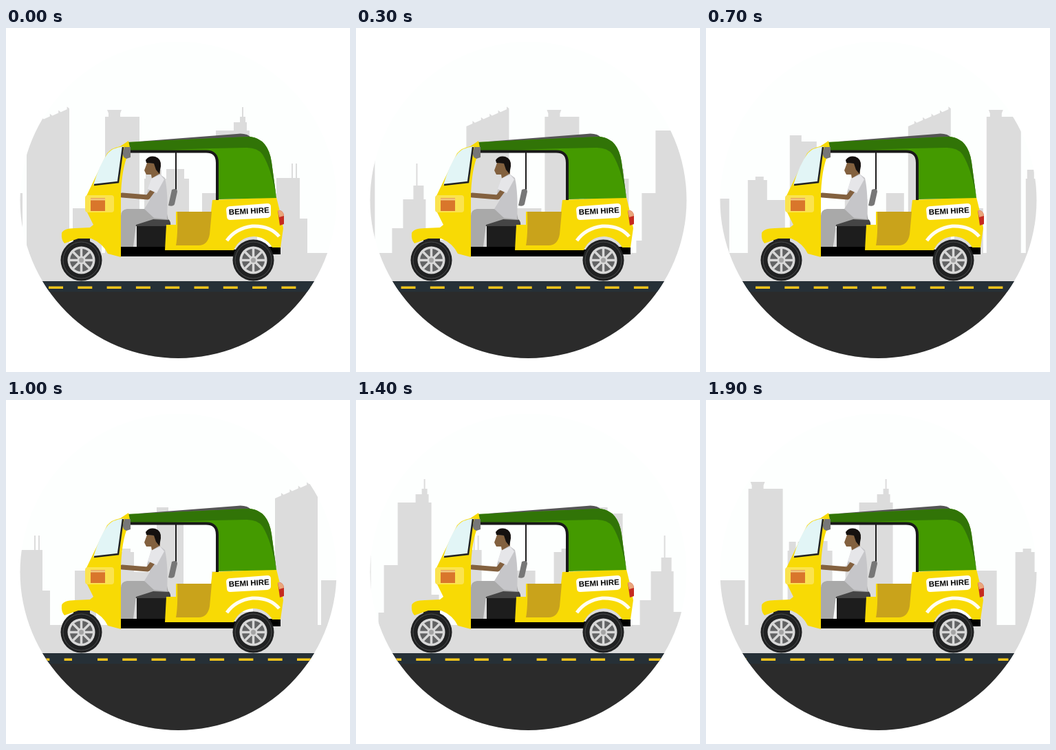
An HTML page that plays this animation: 500x500 px, repeating every 2000 ms.

```html
<!DOCTYPE html>
<html lang="en">
<head>
<meta charset="utf-8">
<title>Auto rickshaw ride</title>
<style>
  html, body { margin: 0; width: 100%; height: 100%; overflow: hidden; background: #fff; }
  svg { display: block; width: 100vw; height: 100vh; }
  text { font: bold 11.4px "Liberation Sans", Arial, sans-serif; }
</style>
</head>
<body>
<svg viewBox="0 0 500 500">
  <defs>
    <clipPath id="disc"><circle cx="250.500" cy="250" r="230"/></clipPath>

    <g id="skyline">
      <!-- low block, stubby tower and slab -->
      <path d="M-261 328V248h31v80zM-203 328V221h11v-5h12v5h5v29h26v53h7V156h17v9h22v163z"/>
      <!-- stepped block with one mast -->
      <path d="M-78 328V291h16v-42h15v-20h4v-32h2v32h9v20h3v59h29v20z"/>
      <path d="M-2 328V240h26v88z"/>
      <path id="sawtooth"/>
      <path d="M97 328V262h42v66z"/>
      <!-- crowned tower -->
      <path d="M144 328V129h5v-5l-2-5h21l-2 5v5h28v199z"/>
      <!-- hall with chimneys -->
      <path d="M201 328V219h2v-13h10v13h3v-13h10v13h7v-14h26v14h7v109z"/>
      <!-- spire tower and its neighbours -->
      <path d="M277 328V309h8V240h20V149h26v-12h9v-8h3v-14h2v14h3v8h2v12h4v134h11v45z"/>
      <!-- block with two masts -->
      <path d="M393 328V218h22v-21h2v21h4v-21h2v21h4v59h11v51z"/>
    </g>

    <g id="wheel">
      <circle r="30" fill="#202122"/>
      <circle r="26.500" fill="none" stroke="#4c4d4e"/>
      <circle r="20" fill="#d8d8d8"/>
      <circle r="16.500" fill="#626364"/>
      <path id="spokes" stroke="#d8d8d8" stroke-width="3.500"/>
      <circle r="6" fill="#d8d8d8"/>
      <circle r="3.500" fill="#a4a4a4"/>
    </g>
  </defs>

  <g clip-path="url(#disc)">
    <rect width="500" height="500" fill="#fdfffe"/>
    <g fill="#dcdcdc">
      <rect y="327" width="500" height="42"/>
      <g id="city"><use href="#skyline"/><use href="#skyline" x="-735"/></g>
    </g>
    <rect y="368" width="500" height="132" fill="#2b2b2b"/>
    <rect y="368" width="500" height="15.500" fill="#263037"/>
    <path id="dashes" fill="#f3c41c"/>
  </g>

  <!-- floor, seat and pole -->
  <path d="M167 318H233V322H336V332H167Z"/>
  <path d="M380 318H399V329H380Z"/>
  <path d="M190 286H233V318H190Z" fill="#1d1d1d"/>
  <path d="M188 278H236Q240 281 239 288H188Z" fill="#454545"/>
  <path d="M247 179V236" stroke="#1c1c1c" stroke-width="2"/>
  <path d="M241 235Q249 232 249 238L245 256Q243 260 236 258Z" fill="#777"/>

  <!-- driver -->
  <path d="M204 263H176Q167 264 167 273V318H185L189 286 214 278 236 279 234 270Z" fill="#a9a9a9"/>
  <path d="M205 196L201 207 204 213 211 213 212 219 224 215 223 197Z" fill="#83613f"/>
  <path d="M203 192Q208 185 217 187 226 190 225 201L223 212 218 206 215 197 204 196Z" fill="#15110f"/>
  <path d="M211 219L223 212 231 218Q236 240 234 278L215 276 201 263 209 250 205 239Z" fill="#c6c6c9"/>
  <path d="M215 234L206 246 169 243" fill="none" stroke="#83613f" stroke-width="7" stroke-linejoin="round" stroke-linecap="round"/>
  <path d="M211 219L224 213 230 220 219 240 206 234Z" fill="#e6e6e9"/>

  <!-- rear body -->
  <path d="M300 250L393 246Q399 268 403 291L399 319H387A31 31 0 0 0 331 323H231L233 286H247V267H298Z" fill="#f8da05"/>
  <path d="M249 267H299L296 300Q293 316 280 316H247Q250 300 249 267Z" fill="#c9a31b"/>
  <path d="M321 309Q334 291 358 288 384 287 397 303" fill="none" stroke="#fffdf0" stroke-width="5"/>
  <path d="M395 265Q403 264 404 273V285L398 287Z" fill="#c52a20"/>
  <path d="M395 265Q403 264 404 273L397 275Z" fill="#e9a57c"/>

  <!-- roof -->
  <path d="M192 165L335 154Q350 152 357 160L300 167Z" fill="#555"/>
  <path d="M177 166L330 159 355 158Q381 161 386 195L393 247 307 249 308 192Q306 180 290 180H178Z" fill="#449a00"/>
  <path d="M177 166L330 159 355 158Q381 161 386 195L393 247Q386 205 373 184 366 174 350 174L300 175 178 179Z" fill="#317407"/>
  <path d="M180 179.500H290Q307 179 307 196V250" fill="none" stroke="#191919" stroke-width="4"/>

  <!-- front body -->
  <path d="M98 306H122V325H98Z" fill="#222"/>
  <path d="M166 172L178 164 181 178Q169 195 167 240V333L148 328Q141 313 124 306L105 306 85 313Q80 308 81 298 84 291 100 291L122 290 127 286 118 268 116 246 126 225 147 182Q154 174 166 172Z" fill="#f8da05"/>
  <path d="M171 172L164 225 127 228Q136 198 148 182 155 174 171 172Z" fill="#e2f5f6"/>
  <path d="M170 173L163 224 128 228" fill="none" stroke="#222" stroke-width="2.500"/>
  <path d="M172 173H181V188L175 190Q169 188 170 181Z" fill="#777"/>
  <rect x="115" y="243" width="42" height="25" rx="4" fill="#fbe34f"/>
  <rect x="123" y="247" width="21" height="19" fill="#d9762b"/>
  <path d="M123 249H144" stroke="#f2c67c" stroke-width="3"/>

  <use href="#wheel" x="109.500" y="337.500"/>
  <use href="#wheel" x="359.500" y="337.500"/>

  <path d="M327 259L380 255Q385 255 385 260V271Q385 275 380 276L326 279Q321 279 321 274L320 264Q320 259 327 259Z" fill="#fff"/>
  <text x="324" y="271.500" transform="rotate(-3 324 271)">BEMI HIRE</text>
</svg>

<script>
const byId = id => document.getElementById(id);
const PITCH = 42.3, DASH = 21;

byId("sawtooth").setAttribute("d", `M30 328V143${"l9 -4v-4l3.400 2.800".repeat(5)}V328z`);
byId("spokes").setAttribute("d", [0, 1, 2, 3].map(i => {
  const x = 17 * Math.cos(i * Math.PI / 4), y = 17 * Math.sin(i * Math.PI / 4);
  return `M${-x} ${-y}L${x} ${y}`;
}).join(""));

// Evenly spaced dashes, with a bare stretch that travels along with the road.
function roadDashes(shift) {
  const bareStart = shift - 265, bareEnd = bareStart + 37;
  const dash = (from, to) => to > from ? `M${from} 375.500H${to}V379H${from}z` : "";
  let d = "";
  for (let x = 62 + shift % PITCH - 2 * PITCH; x < 500; x += PITCH) {
    d += dash(x, Math.min(x + DASH, bareStart)) + dash(Math.max(x, bareEnd), x + DASH);
  }
  return d;
}

// A quick start in coarse jumps, then a steady cruise.
function travel(tick) {
  return Math.min(16.3 * Math.round(2.5 * tick), 37 + 32.4 * tick);
}

const start = performance.now();
function draw() {
  const tick = Math.floor((performance.now() - start) % 2000 / 100);
  const shift = travel(tick);
  byId("city").setAttribute("transform", `translate(${shift})`);
  byId("dashes").setAttribute("d", roadDashes(shift));
  requestAnimationFrame(draw);
}
draw();
</script>
</body>
</html>
```
